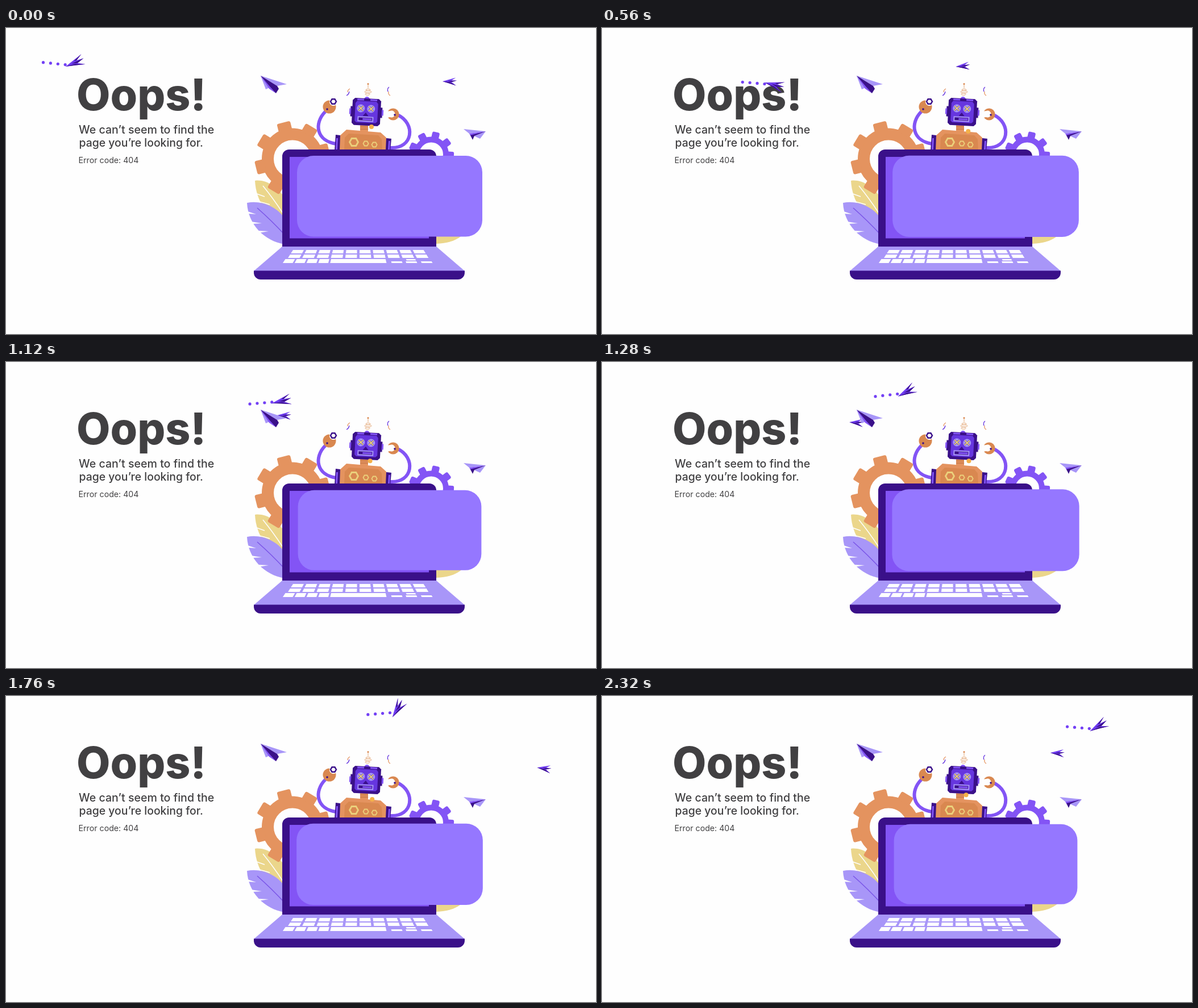
Animation, 1038 px wide and 539 px high, one loop 2.4 s. Source, as an HTML page:

```html
<!DOCTYPE html>
<html lang="en">
<head>
<meta charset="utf-8">
<title>Error 404</title>
<style>
  html, body { margin: 0; height: 100%; overflow: hidden; background: #fefefe; }
  svg { display: block; width: 100vw; height: 100vh; }
  text { font-family: Inter, "Open Sans", sans-serif; fill: #414042; }
  .dark { fill: #3a1089; }
  .violet { fill: #8354f5; }
  .bright { fill: #6f3cf2; }
  .lilac { fill: #a896f8; }
  .orange { fill: #e4935f; }
  .rust { fill: #d98850; }
  .sand { fill: #ebd68b; }
  .line { fill: none; }
</style>
</head>
<body>
<svg viewBox="0 0 1038 539">
  <text x="124" y="145" font-size="77" font-weight="800">Oops!</text>
  <g font-size="19.6" font-weight="500">
    <text x="128" y="186">We can’t seem to find the</text>
    <text x="128.500" y="208.500" font-size="19.4">page you’re looking for.</text>
  </g>
  <text x="127.500" y="238" font-size="14.2">Error code: 404</text>

  <g id="smallPlane">
    <path class="bright" d="M0 0L23-7 16-2 25-2 16 1 24 7 11 3Z"/>
    <path class="dark" d="M0 0L13 1 24 7 11 3ZM9-1L25-2 16 1Z"/>
  </g>

  <!-- resting paper planes -->
  <path class="lilac" d="M448 84L494 99 477 102ZM448 84L457 108 466 104Z"/>
  <path class="violet" d="M448 84L466 104 475 115 463 107Z"/>
  <path class="dark" d="M448 84L477 102 480 107 475 115 465 104Z"/>
  <path class="lilac" d="M805 178L844 182 815 186ZM844 182L823 190 834 195Z"/>
  <path class="violet" d="M844 182L815 186 818 191Z"/>
  <path class="dark" d="M844 182L817 189 821 197 824 190Z"/>

  <!-- leaves -->
  <path class="sand" d="M438 269C456 266 480 280 490 300V342C460 335 440 305 438 269Z"/>
  <path class="line" stroke="#fefefe" stroke-width="1.500" d="M452 278Q470 300 487 326M441 292l14 5M446 306l18 5M455 322l20 2"/>
  <path class="lilac" d="M424 308C450 303 476 315 490 335V381C455 375 426 347 424 308Z"/>
  <path class="line" stroke="#7a55e8" stroke-width="1.500" d="M442 317Q468 340 490 364"/>
  <path fill="#fefefe" d="M425 323l15 5-14-1zM431 341l19 3-17 1zM441 357l21 1-18 3z"/>
  <path class="sand" d="M750 380C775 380 792 376 806 362L750 350Z"/>

  <g id="gears"></g>

  <!-- robot arms and claws -->
  <g class="line" stroke="#8354f5" stroke-width="6">
    <path d="M581 204C546 199 541 168 562 147"/>
    <path d="M676 211C717 213 721 168 689 153"/>
  </g>
  <circle class="rust" cx="569" cy="139" r="11.500"/>
  <circle cx="576" cy="130" r="7" fill="#fefefe"/>
  <path class="line" stroke="#3a1089" stroke-width="2.400" d="M571 129.500l2.500-4.200h5l2.500 4.200-2.500 4.200h-5z"/>
  <circle class="dark" cx="565" cy="143" r="1.800"/>
  <circle class="rust" cx="681" cy="152" r="10.500"/>
  <path fill="#fefefe" d="M669 147l7-1a6 6 0 1 1 0 11l-7 1z"/>
  <circle class="dark" cx="684" cy="153" r="1.800"/>

  <!-- robot torso -->
  <path class="orange" d="M623 171h14v11h-14z"/>
  <path stroke="#b86b3c" d="M623 174h14M623 178h14"/>
  <path class="orange" d="M599 179L659 184 669 193 670 216H584L587 190Z"/>
  <path class="rust" d="M603 186L655 189 661 196 662 216H595L596 193Z"/>
  <path class="dark" d="M580 188l8 1-1 27h-9zM669 194l9 1-2 21h-8z"/>
  <path class="violet" d="M581 194h3l-1 20h-3zM673 199h3l-1 15h-3z"/>
  <g class="line" stroke="#ebd07b" stroke-width="2.800">
    <path d="M604.500 201l3.700-6.500h7.600l3.700 6.500-3.700 6.500h-7.600z"/>
    <path stroke-width="1.800" d="M628.500 203.500l2.300-4h4.600l2.300 4-2.300 4h-4.600zM643.500 205.500l2.300-4h4.600l2.300 4-2.300 4h-4.600z"/>
  </g>

  <!-- robot head -->
  <g class="line" stroke="#e4a878">
    <path d="M637 99v7"/>
    <ellipse cx="637" cy="109" rx="4" ry="1.500"/>
    <ellipse cx="637" cy="112.500" rx="6" ry="1.800"/>
    <ellipse cx="636" cy="116.500" rx="4" ry="1.800"/>
  </g>
  <circle class="rust" cx="637" cy="98.500" r="1.500"/>
  <g transform="rotate(3 634 148)">
    <path class="violet" d="M629 126a5 5 0 0 1 10 0z"/>
    <path class="dark" d="M606 139h4v18h-4zM658 139h4v18h-4z"/>
    <path class="violet" d="M604 143h3v10h-3zM661 143h3v10h-3z"/>
    <path class="dark" d="M613 124H655L659 128V168L655 172H613L609 168V128Z"/>
    <path fill="#6636df" d="M617 129H651L654 133V164L651 167H617L614 164V133Z"/>
    <path class="violet" d="M617 125h12v3h-12zM640 125h12v3h-12z"/>
    <g id="eye">
      <circle class="lilac" cx="624" cy="142" r="7"/>
      <path stroke="#4b2890" stroke-width="3" d="M620 138l8 8m0-8l-8 8"/>
      <path stroke="#ebd07b" stroke-width="2" d="M620 138l8 8m0-8l-8 8"/>
    </g>
    <use href="#eye" x="18"/>
    <path class="dark" d="M633 149l5 6h-10z"/>
    <path class="lilac" d="M619 156h28v9h-28z"/>
    <path class="dark" d="M621 158h24v5h-24z"/>
    <path class="violet" d="M628 159h16v3h-16z"/>
  </g>
  <g class="line" stroke-width="1.300">
    <path stroke="#e4935f" d="M605 107q-4 2-4 6M673 112q-1 5 3 7"/>
    <path stroke="#6636df" d="M604 112q-1 5-5 7M674 104q-4 3-2 8"/>
  </g>
  <circle id="bulb" r="4" fill="#f4b14a"/>

  <!-- laptop -->
  <path class="dark" d="M486 386V226a12 12 0 0 1 12-12H745a12 12 0 0 1 12 12V386Z"/>
  <path class="violet" d="M499 227H744V370.500H499Z"/>
  <path class="lilac" d="M486 385H757L807 428H436Z"/>
  <path class="dark" d="M436 427.500H807V431a12 12 0 0 1-12 12H448a12 12 0 0 1-12-12Z"/>
  <path id="keys" fill="#fefefe"/>

  <rect id="panel" rx="29" fill="#9577ff"/>

  <g id="dots" fill="#7340f5"></g>
  <g id="plane">
    <path class="bright" d="M0 0L34-10 22-3 35-2 22 2 34 9 16 4Z"/>
    <path class="dark" d="M0 0L18 2 34 9 16 4ZM12-1L35-2 22 2ZM18-4L34-10 22-3Z"/>
  </g>
</svg>
<script>
const $ = id => document.getElementById(id);
const LOOP = 2400, STEP = 80, TAU = 2 * Math.PI;

function gear(x, y, teeth, first, inner, outer, tip, width, color) {
  let out = `<circle cx="${x}" cy="${y}" r="${(inner + outer) / 2}" fill="#fefefe"
    stroke="${color}" stroke-width="${outer - inner}"/>`;
  for (let i = 0; i < teeth; i++)
    out += `<rect x="${x + outer - 4}" y="${y - width / 2}" width="${tip - outer + 4}" height="${width}"
      rx="3" fill="${color}" transform="rotate(${first + i * 360 / teeth} ${x} ${y})"/>`;
  return out;
}
$('gears').innerHTML =
  gear(504, 230.500, 8, -104, 33, 54, 66, 24, '#e4935f') +
  gear(748, 222.500, 9, -77, 21, 31, 40, 13, '#8354f5');

// A key given by its edges on the top row, widened towards the viewer.
function key(left, right, top, bottom) {
  const at = (u, y) => `${621 + u * (1 + (y - 391) * .0055)} ${y}`;
  return `M${at(left, top)}L${at(right, top)} ${at(right, bottom)} ${at(left, bottom)}Z`;
}
let keys = '';
for (const top of [391, 399])
  for (let i = 0; i < 10; i++) keys += key(-116 + i * 23.4, -97 + i * 23.4, top, top + 6);
for (let i = 0; i < 4; i++) keys += key(-119 + i * 18.5, -103.500 + i * 18.5, 407, 414);
keys += key(-45, 43, 407, 414) + key(76, 91, 407, 409.500);
for (const left of [51, 74, 98]) keys += key(left, left + 17, 411, 414);
$('keys').setAttribute('d', keys);

$('dots').innerHTML = '<circle r="2.600"/>'.repeat(4);
const dots = [...$('dots').children];

function set(el, attrs) {
  for (const name in attrs) el.setAttribute(name, attrs[name]);
}
const wave = (t, start, period = LOOP) => Math.sin(TAU * (t - start) / period);

function draw(t) {
  const pulse = wave(t, 0, 1200);
  const w = 163 + 4 * pulse, h = w * .437;
  set($('panel'), { x: 675 - w, y: 296.300 - h, width: 2 * w, height: 2 * h, rx: w * .178 });
  set($('bulb'), { cx: 643 + 6 * pulse, cy: 178 - 4 * wave(t, -300, 1200) });

  const x = 65.500 + .3246 * t, y = 64 + 32 * wave(t, 40);
  const slope = 1.6 * wave(t, -360);
  dots.forEach((dot, i) => set(dot, { cx: x + 12.900 * i, cy: y + slope * i }));
  const tilt = -21 + 37 * wave(t, 10);
  set($('plane'), {
    transform: `translate(${x + 48} ${y + 3 * slope}) rotate(${tilt}) translate(-9.500 0)`
  });

  const back = wave(t, 1160);
  const bx = 768 - .26 * t + (t > 1680 ? 624 : 0);
  set($('smallPlane'), { transform: `translate(${bx} ${97 + 29 * back}) rotate(${2 + 6 * back})` });
}

function tick() {
  draw(Math.floor(performance.now() % LOOP / STEP) * STEP);
  requestAnimationFrame(tick);
}
tick();
</script>
</body>
</html>
```
